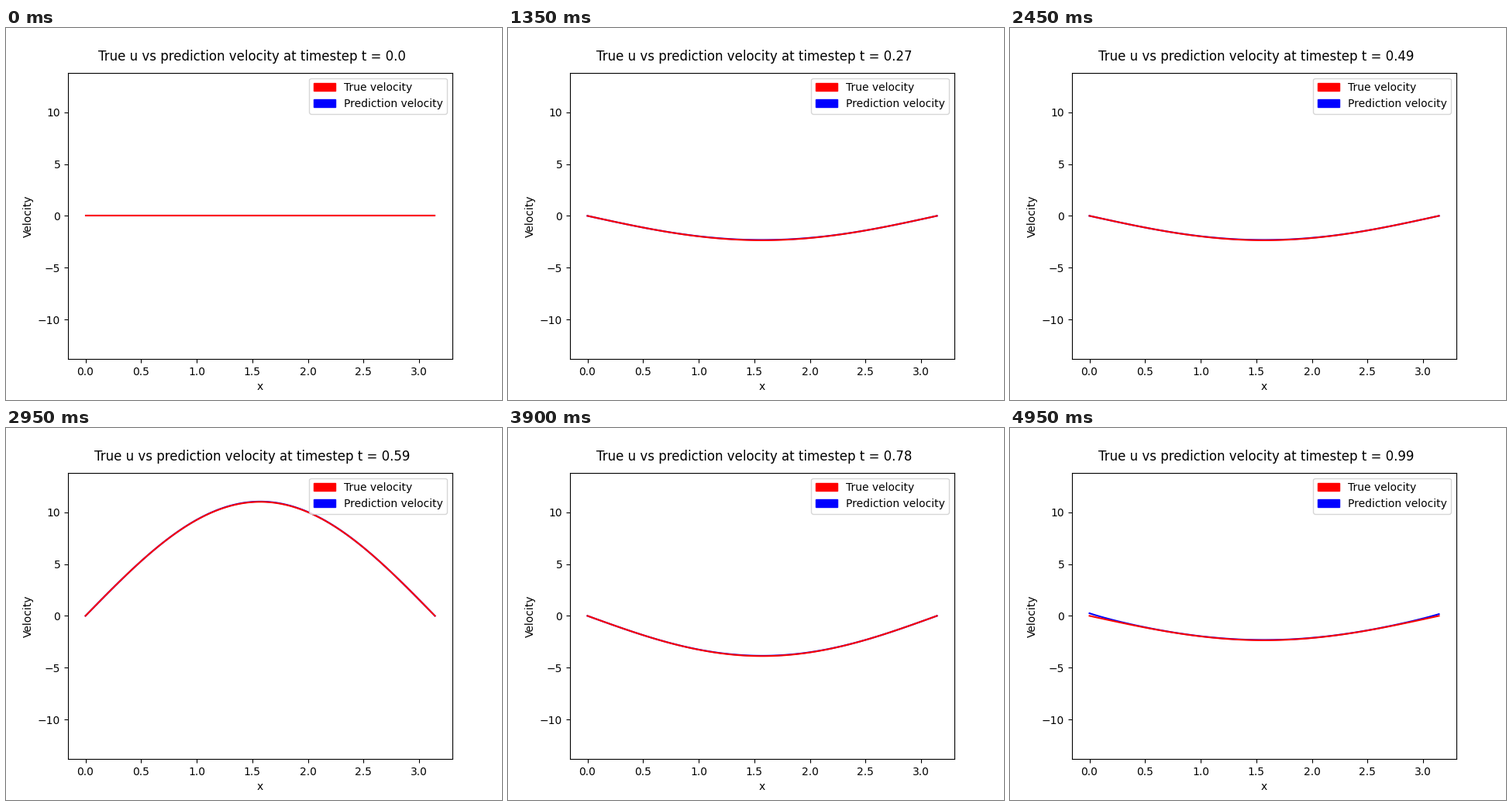
Recreate the animation shown at these times as a matplotlib script. Size 640 px wide and 480 px high, loop 5 s.

```python
import numpy as np
import matplotlib.pyplot as plt
from matplotlib.animation import FuncAnimation
from matplotlib.patches import Patch

STEPS = 100
DT = 0.01
OMEGA = 4 * np.pi
x = np.linspace(0, np.pi, 100)


def true_velocity(n):
    """Backward difference of a standing wave, at rest in the first step."""
    if n == 0:
        return np.zeros_like(x)
    swing = np.cos(OMEGA * (n - 1) * DT) - np.cos(OMEGA * n * DT)
    return swing / DT * np.sin(x)


def prediction(n):
    """True velocity plus a small error that grows at the ends late on."""
    if n == 0:
        return np.zeros_like(x)
    late = np.clip((n * DT - 0.85) / 0.14, 0, 1) ** 2
    ends = 0.25 * np.exp(-x / 0.22) + 0.17 * np.exp((x - np.pi) / 0.22)
    return true_velocity(n) + 0.03 * np.sin(x) ** 4 + late * ends


fig, ax = plt.subplots(figsize=(6.4, 4.8), dpi=100)
ax.set_xlim(-0.05 * np.pi, 1.05 * np.pi)
ax.set_ylim(-1.1 * OMEGA, 1.1 * OMEGA)
ax.set_xlabel("x")
ax.set_ylabel("Velocity")

pred_line, = ax.plot(x, prediction(0), color="blue")
true_line, = ax.plot(x, true_velocity(0), color="red")
title = ax.text(1.5, 15, "", ha="center", fontsize=12)
ax.legend(handles=[Patch(color="red", label="True velocity"),
                   Patch(color="blue", label="Prediction velocity")],
          loc="upper right")


def update(n):
    pred_line.set_ydata(prediction(n))
    true_line.set_ydata(true_velocity(n))
    title.set_text("True u vs prediction velocity at timestep "
                   f"t = {round(n * DT, 2)}")
    return pred_line, true_line, title


anim = FuncAnimation(fig, update, frames=STEPS, interval=50, repeat=True)
plt.show()
```
